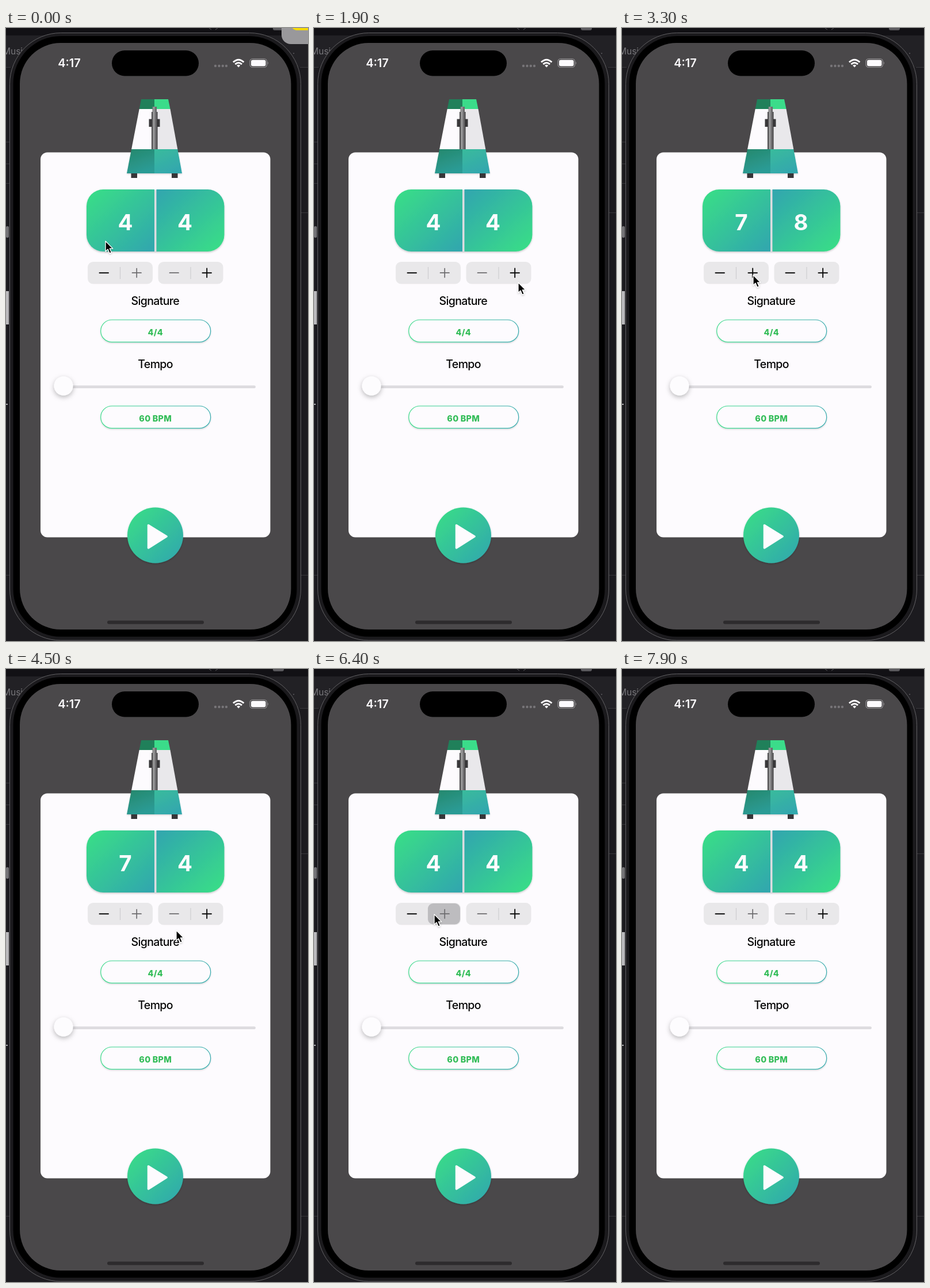
An HTML page for the animation above (8 s loop, 525x1067 px).

```html
<!DOCTYPE html>
<html lang="en">
<head>
<meta charset="utf-8">
<title>Metronome</title>
<style>
  html, body { margin: 0; width: 100%; height: 100%; overflow: hidden; background: #1c1b1f; }
  svg { display: block; width: 100%; height: 100%; }
  text { font-family: Inter, Roboto, sans-serif; text-anchor: middle; }
  .digit { font-size: 38.5px; font-weight: 700; fill: #fdfbfe; }
  .label { font-size: 19.5px; font-weight: 500; letter-spacing: -.65px; fill: #050505; }
  .value { font-size: 14.4px; font-weight: 800; letter-spacing: .25px; fill: #34bd59; }
  .pill { fill: #fdfbfe; stroke: url(#edge); stroke-width: 1.2; filter: url(#faint); }
  .step { fill: none; stroke: #0a0a0a; stroke-width: 1.9; stroke-linecap: round; }
  .off { stroke: #6c6b6e; stroke-width: 1.7; }
  .press { fill: #bdbcbf; visibility: hidden; }
  .press.on { visibility: visible; }
</style>
</head>
<body>
<svg viewBox="0 0 525 1067" preserveAspectRatio="none">
  <defs>
    <linearGradient id="mint" x1="0" y1="0" x2="1" y2="1">
      <stop offset=".08" stop-color="#39db89"/><stop offset=".95" stop-color="#31a8ad"/>
    </linearGradient>
    <linearGradient id="sea" x1="0" y1="0" x2="1" y2="1">
      <stop offset=".05" stop-color="#31a8ad"/><stop offset=".92" stop-color="#39db89"/>
    </linearGradient>
    <linearGradient id="edge">
      <stop offset="0" stop-color="#3bdc8a"/><stop offset="1" stop-color="#35aaad"/>
    </linearGradient>
    <linearGradient id="baseL" x1="0" y1="0" x2=".4" y2="1">
      <stop offset="0" stop-color="#25886c"/><stop offset="1" stop-color="#2c9b95"/>
    </linearGradient>
    <linearGradient id="baseR" x1="0" y1="0" x2=".5" y2="1">
      <stop offset="0" stop-color="#3abb9c"/><stop offset="1" stop-color="#33a8ad"/>
    </linearGradient>
    <linearGradient id="rod">
      <stop offset="0" stop-color="#777"/><stop offset=".45" stop-color="#a5a5a6"/>
      <stop offset=".55" stop-color="#777678"/><stop offset="1" stop-color="#656466"/>
    </linearGradient>
    <filter id="faint" x="-5%" y="-20%" width="110%" height="150%">
      <feDropShadow dx="0" dy="1.5" stdDeviation="1.2" flood-opacity=".16"/>
    </filter>
    <filter id="soft" x="-20%" y="-20%" width="140%" height="150%">
      <feDropShadow dx="0" dy="1.5" stdDeviation="1.5" flood-opacity=".22"/>
    </filter>
    <filter id="lift" x="-40%" y="-40%" width="180%" height="200%">
      <feDropShadow dx="0" dy="3" stdDeviation="4" flood-opacity=".28"/>
    </filter>
  </defs>

  <!-- desktop behind the phone -->
  <rect width="525" height="1067" fill="#1c1b1f"/>
  <rect width="525" height="13" fill="#121115"/>
  <rect y="13" width="525" height="55" fill="#222125"/>
  <rect x="399" y="8" width="9" height="6" fill="#29282c"/>
  <path d="M0 68.500H8M511 68.500H525M0 198.500H6M0 236.500H6M0 270.500H6M513 321.500H525M0 952.500H8M513 952.500H525" stroke="#39383c"/>
  <rect y="345" width="5" height="20" rx="2" fill="#737275"/>
  <rect y="458" width="5" height="58" fill="#b9b8bb"/>
  <rect y="654" width="3" height="2" fill="#a5a4a7"/>
  <text x="-6" y="46" font-size="15.500" fill="#77767a" style="text-anchor:start">Musi</text>
  <text x="500" y="45" font-size="13" fill="#77767a">.</text>
  <path d="M353 0l4 3M368 0l-4 3" stroke="#555458"/>
  <rect x="464" y="-8" width="19" height="12" rx="3" fill="#5a595d"/>
  <g id="patch">
    <rect x="479" y="-30" width="80" height="58" rx="16" fill="#99989b"/>
    <path d="M498 0H525V4H505Q500 3 498 0Z" fill="#f5d90a"/>
  </g>

  <!-- phone -->
  <rect x="6.500" y="8.500" width="506" height="1057.500" rx="89" fill="#1b1a1d" stroke="#626164"/>
  <rect x="12.500" y="14" width="493" height="1045.500" rx="83" fill="#000"/>
  <rect x="24" y="26" width="471.500" height="1021" rx="71" fill="#4a484a"/>
  <rect x="184" y="39" width="151" height="44.500" rx="22.200" fill="#000"/>
  <text x="110" y="68" font-size="20" font-weight="600" fill="#fdfbfe">4:17</text>
  <g fill="#777578">
    <circle cx="364" cy="66" r="2.200"/><circle cx="370.500" cy="66" r="2.200"/>
    <circle cx="376.800" cy="66" r="2.200"/><circle cx="383" cy="66" r="2.200"/>
  </g>
  <g fill="none" stroke="#fdfbfe" stroke-width="3">
    <path d="M395 59.500Q404.200 51 413.400 59.500M398.400 63.200Q404.200 57.800 410 63.200"/>
    <path d="M401.200 65.300Q404.200 62.600 407.200 65.300L404.200 68.500Z" fill="#fdfbfe" stroke="none"/>
  </g>
  <rect x="424" y="53.500" width="29.500" height="15" rx="4.800" fill="none" stroke="#918f92" stroke-width="1.200"/>
  <rect x="426" y="55.500" width="25.500" height="11" rx="3" fill="#fdfbfe"/>
  <path d="M455 58.500Q457 61 455 63.500Z" fill="#918f92"/>
  <rect x="176" y="1031.500" width="168" height="6" rx="3" fill="#2d2b2d"/>

  <rect x="60" y="216.500" width="399.500" height="670" rx="12" fill="#fdfbfe"/>

  <!-- metronome -->
  <path d="M235 124H258V141H231.700Z" fill="#20805a"/>
  <path d="M258 124H282L285.500 141H258Z" fill="#3bdc8a"/>
  <path d="M231.700 141H258V211H218.100Z" fill="#fdfbfe"/>
  <path d="M258 141H285.500L298.300 211H258Z" fill="#e9e8eb"/>
  <g filter="url(#faint)">
    <path d="M218.100 211H258V253H210Z" fill="url(#baseL)"/>
    <path d="M258 211H298.300L306 253H258Z" fill="url(#baseR)"/>
  </g>
  <path d="M217.500 253h10.500v8h-10.500zM288 253h10.500v8H288z" fill="#373639"/>
  <rect x="253" y="146" width="10.500" height="65" fill="#424143"/>
  <rect x="248.500" y="158.500" width="19" height="13.500" fill="#39383a"/>
  <rect x="254.500" y="137" width="7.500" height="74" fill="url(#rod)"/>

  <!-- signature tiles -->
  <g filter="url(#soft)">
    <rect x="257" y="282" width="5" height="107" fill="#dddce0"/>
    <path d="M258 281V389H169A29 29 0 0 1 140 360V310A29 29 0 0 1 169 281Z" fill="url(#mint)"/>
    <path d="M261.500 281V389H350.500A29 29 0 0 0 379.500 360V310A29 29 0 0 0 350.500 281Z" fill="url(#sea)"/>
  </g>
  <text id="num" class="digit" x="207.500" y="352">4</text>
  <text id="den" class="digit" x="311" y="352">4</text>

  <!-- steppers -->
  <rect x="142" y="407" width="113" height="38.500" rx="9.500" fill="#e9e8ea"/>
  <rect x="264.500" y="407" width="113" height="38.500" rx="9.500" fill="#e9e8ea"/>
  <path d="M198.500 416V437M321 416V437" stroke="#cecdd0" stroke-width="1.200"/>
  <g id="presses">
    <rect class="press" x="142.500" y="408" width="56" height="36.500" rx="9"/>
    <rect class="press" x="198" y="408" width="56" height="36.500" rx="9"/>
    <rect class="press" x="265" y="408" width="56" height="36.500" rx="9"/>
    <rect class="press" x="320.500" y="408" width="56" height="36.500" rx="9"/>
  </g>
  <path class="step" d="M162.500 426.200H178"/>
  <path id="numUp" class="step" d="M219.500 426.200H235M227.200 418.500V434"/>
  <path id="denDown" class="step" d="M284.500 426.200H300"/>
  <path class="step" d="M341.500 426.200H357M349.200 418.500V434"/>

  <!-- labels, slider, play -->
  <text class="label" x="259.300" y="482">Signature</text>
  <rect class="pill" x="164.700" y="508" width="191" height="38.700" rx="19.300"/>
  <text class="value" x="259.700" y="535">4/4</text>
  <text class="label" x="259.600" y="591.500">Tempo</text>
  <rect x="84" y="622.300" width="350" height="4.800" rx="2.400" fill="#dddbdf"/>
  <circle cx="100" cy="623" r="16.500" fill="#fdfcfe" filter="url(#lift)"/>
  <rect class="pill" x="164.700" y="658" width="191" height="38.700" rx="19.300"/>
  <text class="value" x="259.700" y="685.300">60 BPM</text>
  <circle cx="259.500" cy="883" r="48.500" fill="url(#mint)" filter="url(#soft)"/>
  <path d="M247.500 865.500V905L279 885Z" fill="#fdfbfe" stroke="#fdfbfe" stroke-width="3.500" stroke-linejoin="round"/>

  <path id="cursor" d="M0 0V17.800L4.100 14.100L7.100 21.200L10.300 19.800L7.300 12.900H12.700Z" fill="#000" stroke="#fff" stroke-width="1.300" stroke-linejoin="round" filter="url(#soft)"/>
</svg>
<script>
  const LOOP = 8000, TICK = 100;
  const $ = id => document.getElementById(id);
  const presses = [...$('presses').children];

  // time, x, y of the pointer tip
  const path = [
    [0, 173, 371], [900, 173, 371], [1700, 355, 443], [2200, 355, 443],
    [2600, 228, 430], [3400, 228, 430], [3900, 291, 430], [4200, 291, 430],
    [4500, 296, 455], [4700, 296, 455], [5200, 176, 430], [5900, 176, 430],
    [6200, 209, 427], [6600, 209, 427], [7200, 250, 45], [7500, 254, -35], [LOOP, 254, -35]
  ];

  // time, pressed half, numerator change, denominator change
  const taps = [
    [2100, 3, 0, 4], [2700, 1, 1, 0], [2900, 1, 1, 0], [3100, 1, 1, 0],
    [4100, 2, 0, -4], [5400, 0, -1, 0], [5600, 0, -1, 0], [5800, 0, -1, 0],
    [6400, 1, 0, 0]
  ];

  function pointer(t) {
    const i = path.findIndex(k => k[0] > t);
    const [t0, x0, y0] = path[i - 1], [t1, x1, y1] = path[i];
    const p = (t - t0) / (t1 - t0), e = p * p * (3 - 2 * p);
    return [x0 + (x1 - x0) * e, y0 + (y1 - y0) * e];
  }

  function draw(t) {
    let num = 4, den = 4, held = -1;
    for (const [at, half, dn, dd] of taps) {
      if (t < at) break;
      num += dn;
      den += dd;
      held = t < at + TICK ? half : -1;
    }
    $('num').textContent = num;
    $('den').textContent = den;
    $('numUp').classList.toggle('off', den === 4);
    $('denDown').classList.toggle('off', den === 4);
    presses.forEach((el, i) => el.classList.toggle('on', i === held));
    $('patch').style.visibility = t < 1000 ? 'visible' : 'hidden';
    $('cursor').setAttribute('transform', `translate(${pointer(t)})`);
  }

  const start = performance.now();
  function frame() {
    const t = (performance.now() - start) % LOOP;
    draw(Math.floor(t / TICK) * TICK);
    requestAnimationFrame(frame);
  }
  frame();
</script>
</body>
</html>
```
